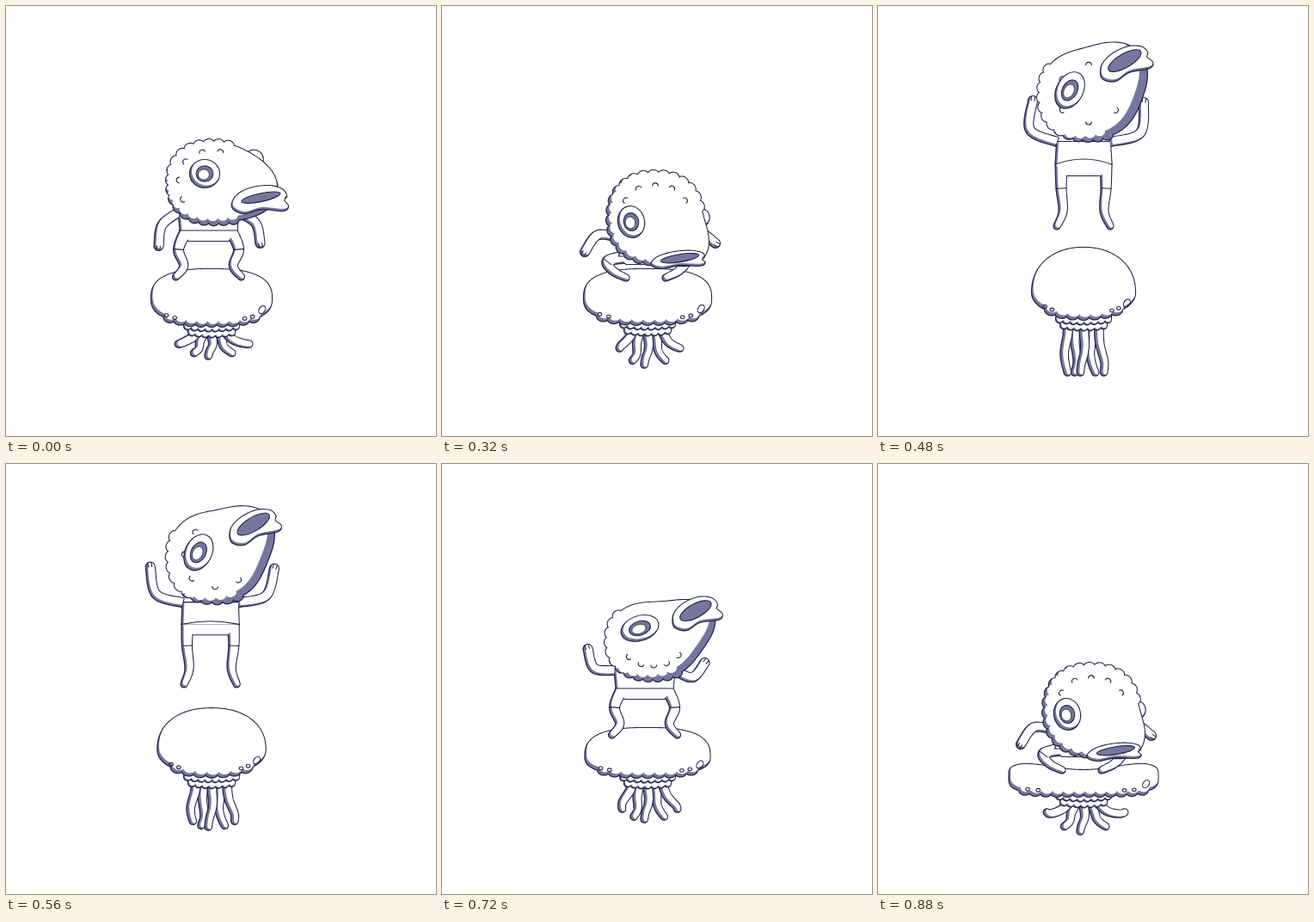
An HTML page with a canvas that plays this animation: 500 px wide and 500 px high, repeating every 960 ms.

```html
<!DOCTYPE html>
<html lang="en">
<head>
<meta charset="utf-8">
<title>Bounce</title>
<style>
html, body { margin: 0; width: 100%; height: 100%; overflow: hidden; background: #fff; }
canvas { display: block; width: 100vw; height: 100vh; }
</style>
</head>
<body>
<canvas id="stage" width="500" height="500"></canvas>
<script>
const ctx = document.getElementById('stage').getContext('2d');
const INK = '#25244a', SHADE = '#75779c', PAPER = '#fff';
const STEP = 80, RAD = Math.PI / 180;

// Heads: offsets are from the skull centre, angles in degrees.
// snout: angle, reach, spread. wool and marks: angular ranges.
const forward = {
  at: [240, 205], size: [50, 46], snout: [8, 26, 35], wool: [-60, -305], marks: [-75, -210], markAt: .77,
  eye: [-9, -10], eyeSize: [17, 16], eyeTilt: 0, far: [-29, 10.5],
  mouth: [56, 19], lips: [32, 15], lipTilt: -12, open: .32, light: [-1, -5]
};
const down = {
  at: [248, 246], size: [53, 51], snout: [40, 18, 30], wool: [-8, -268], marks: [-30, -150], markAt: .72,
  eye: [-28, 5], eyeSize: [15, 18], eyeTilt: -12, far: [0, 10.5],
  mouth: [28, 48], lips: [31, 9], lipTilt: -9, open: .5, light: [3, -3]
};
const upward = {
  at: [245, 103], size: [56, 51], snout: [-40, 20, 40], wool: [-142, -301], marks: [-90, -330], markAt: .62,
  eye: [-22, -5], eyeSize: [15, 22], eyeTilt: 28, far: [-29, 0],
  mouth: [42, -38], lips: [30, 16], lipTilt: -30, open: .5, light: [-9, -4]
};
const falling = {
  ...upward, at: [243, 115], size: [52, 52], snout: [-32, 22, 30], wool: [-157, -311], marks: [-190, -290], markAt: .75,
  eye: [-18, -5], eyeSize: [15, 21], eyeTilt: 25, mouth: [46, -34], lips: [29, 16], lipTilt: -32, light: [-6, -5]
};
const landing = {
  ...falling, at: [245, 205], size: [52, 44], snout: [-25, 25, 30], wool: [-138, -313], marks: [-215, -330], markAt: .65,
  eye: [-15, -14], eyeSize: [22, 14], eyeTilt: -18, mouth: [50, -33], lips: [28, 16], lipTilt: -28
};

// Bodies: offsets are from the middle of the waist; legs mirror each other.
const stand = {
  at: [235.5, 261], shoulder: [35, -21], waist: 33, crotch: [23, 12], sag: 0,
  handL: [-58, 18], handR: [60, 15], bend: 9, knee: [35, 22], toe: [38, 54], instep: 8
};
const crouch = {
  at: [237, 291], shoulder: [32, -22], waist: 32, crotch: [23, 9], sag: 0,
  handL: [-71, -5], handR: [81, -15], bend: 12, knee: [45, 6], toe: [23, 25], instep: -6
};
const leap = {
  at: [239, 184], shoulder: [31, -26], waist: 32.5, crotch: [20, 13], sag: -12,
  handL: [-59, -74], handR: [70, -72], bend: -20, knee: [26, 28], toe: [31, 72], instep: 5
};
const fall = {
  at: [235.5, 190], shoulder: [34, -24], waist: 34, crotch: [21, 10], sag: 0,
  handL: [-86, -56], handR: [81, -54], bend: -11, knee: [29, 20], toe: [30, 66], instep: 4
};
const land = { ...stand, handL: [-66, -46], handR: [70, -30], bend: -13 };

// Jelly: top, widest and bottom y, half width, squareness, dip of the top; tentacle length, fan and curl.
const jelly = (top, mid, bottom, half, square, dip, length, fan, curl) =>
  ({ top, mid, bottom, half, square, dip, length, fan, curl });
const rest = jelly(306, 340, 369, 70, 2.6, 0, 26, 12, 14);
const rise = jelly(296, 332, 363, 70, 2.3, 0, 44, 10, 22);
const pressed = jelly(306, 340, 367, 74, 2.7, 0, 38, 9, 19);
const tall = jelly(281, 333, 361, 60, 2.15, 0, 53, 2, 0);
const waiting = jelly(289, 330, 360, 66.5, 2.3, 0, 44, 6, 17);
const hit = jelly(307, 340, 361, 72.5, 2.7, 0, 40, 7.5, 12);
const flat = jelly(346, 363, 383, 86.5, 4, 10, 32, 14, 22);

function mix(a, b, k) {
  if (typeof a === 'number') return a + (b - a) * k;
  if (Array.isArray(a)) return a.map((v, i) => mix(v, b[i], k));
  return Object.fromEntries(Object.keys(a).map(key => [key, mix(a[key], b[key], k)]));
}
const lower = (part, dy) => ({ ...part, at: [part.at[0], part.at[1] + dy] });
const pose = (head, body, bell) => ({ head, body, bell });

const standing = pose(forward, stand, rest);
const raised = pose(lower(forward, -9), lower(stand, -12.5), rise);
const crouched = pose(down, crouch, pressed);
const high = pose(upward, leap, tall);
const dropping = pose(falling, fall, waiting);
const touching = pose(landing, land, hit);
const sunk = pose(lower(down, 40), lower(crouch, 40), flat);
const cycle = [
  standing, mix(standing, raised, .5), raised, mix(raised, crouched, .5), crouched, mix(crouched, high, .5),
  high, mix(high, dropping, .4), dropping, touching, mix(touching, sunk, .5), sunk
];

const add = (a, b) => [a[0] + b[0], a[1] + b[1]];
const polar = (angle, r) => [Math.cos(angle * RAD) * r, Math.sin(angle * RAD) * r];
const sweep = (from, to, count, at) => Array.from({ length: count + 1 }, (_, i) => at(from + (to - from) * i / count));

function superRadius(angle, rx, ry, n) {
  const [c, s] = polar(angle, 1);
  return (Math.abs(c / rx) ** n + Math.abs(s / ry) ** n) ** (-1 / n);
}

// Smooth curve through the given points.
function curve(points, closed = false, steps = 10) {
  const n = points.length, out = [];
  const at = i => points[closed ? (i + n) % n : Math.max(0, Math.min(n - 1, i))];
  for (let i = 0; i < (closed ? n : n - 1); i++) {
    for (let s = 0; s < steps; s++) {
      const t = s / steps;
      out.push([0, 1].map(d => {
        const [a, b, c, e] = [-1, 0, 1, 2].map(k => at(i + k)[d]);
        return b + t / 2 * (c - a + t * (2 * a - 5 * b + 4 * c - e + t * (3 * (b - c) + e - a)));
      }));
    }
  }
  if (!closed) out.push(points[n - 1]);
  return out;
}

function offset(points, i, w) {
  const a = points[Math.max(0, i - 1)], b = points[Math.min(points.length - 1, i + 1)];
  const dx = b[0] - a[0], dy = b[1] - a[1], d = Math.hypot(dx, dy) || 1;
  return add(points[i], [-dy / d * w, dx / d * w]);
}

function scallop(points, size, depth) {
  let total = 0;
  const along = points.map((p, i) => total += i ? Math.hypot(p[0] - points[i - 1][0], p[1] - points[i - 1][1]) : 0);
  const count = Math.round(total / size);
  return points.map((p, i) => offset(points, i, depth * Math.sqrt(Math.abs(Math.sin(Math.PI * count * along[i] / total)))));
}

function polygon(points) {
  const path = new Path2D();
  points.forEach(([x, y]) => path.lineTo(x, y));
  path.closePath();
  return path;
}

function limb(points, from, to) {
  const mid = curve(points), last = mid.length - 1;
  const side = sign => mid.map((p, i) => offset(mid, i, sign * (from + (to - from) * i / last) / 2));
  const left = side(1), right = side(-1).reverse();
  const start = Math.atan2(left[last][1] - mid[last][1], left[last][0] - mid[last][0]) / RAD;
  const end = sweep(start, start - 180, 8, a => add(mid[last], polar(a, to / 2)));
  return polygon([...left, ...end, ...right]);
}

function ellipse([x, y], [rx, ry], tilt = 0) {
  const path = new Path2D();
  path.ellipse(x, y, rx, ry, tilt * RAD, 0, Math.PI * 2);
  return path;
}

function line(path, width = 1.1) {
  ctx.strokeStyle = INK;
  ctx.lineWidth = width;
  ctx.stroke(path);
}
function fill(path, colour) {
  ctx.fillStyle = colour;
  ctx.fill(path);
}
// Shadow stays where the paper-coloured copy has been shifted away.
function shaded(path, dx, dy) {
  ctx.save();
  ctx.clip(path);
  fill(path, SHADE);
  ctx.translate(dx, dy);
  fill(path, PAPER);
  ctx.restore();
}
function solid(path, dx, dy) {
  line(path, 2.2);
  shaded(path, dx, dy);
}
function segment([x1, y1], [x2, y2], sag = 0) {
  const path = new Path2D();
  path.moveTo(x1, y1);
  path.quadraticCurveTo((x1 + x2) / 2, (y1 + y2) / 2 + sag, x2, y2);
  line(path);
}

function drawJelly({ top, mid, bottom, half, square, dip, length, fan, curl }) {
  const cx = 239, under = bottom - mid;
  for (const i of [-1, 1, -2, 2, 0]) {
    const strand = sweep(0, 1, 5, s => [
      cx + i * (9 + fan * s) + 4 * Math.sin(s * 5 + i * 2) * s,
      bottom + 12 + length * s - curl * (i * s / 2) ** 2
    ]);
    solid(limb(strand, 10, 7.5), 2.8, -1);
  }
  for (const [w, drop] of [[27, 13], [32, 6]]) {
    const hem = scallop(sweep(-1, 1, 80, k => [cx + k * w, bottom + drop - 3 * k * k]), 8, 3.5);
    solid(polygon([[cx - w, bottom], ...hem, [cx + w, bottom]]), 1, -1);
  }
  const rim = angle => {
    const ry = angle < 0 ? mid - top : under;
    const [x, y] = polar(angle, superRadius(angle, half, ry, square));
    const sink = angle < 0 ? dip * Math.cos(x / half * Math.PI / 2) ** 2 : 0;
    return [cx + x, mid + y + sink];
  };
  const edge = Math.atan2(under * .75, half * .8) / RAD;
  const hem = scallop(sweep(180 - edge, edge, 240, rim), 13, 4);
  solid(polygon([...hem, ...sweep(edge, -180 - edge, 160, a => rim(a < -180 ? a + 360 : a))]), 1.6, -3.2);
  for (const k of [-.75, -.61, .55, .68]) {
    const y = mid + under * (1 - Math.abs(k) ** square) ** (1 / square) - 3;
    line(ellipse([cx + half * k, y], [2.3, 1.9]));
  }
  line(ellipse([cx + half * .84, mid + under * .45], [3.4, 5], 35));
}

function arm(shoulder, hand, bend) {
  const dx = hand[0] - shoulder[0], dy = hand[1] - shoulder[1], d = Math.hypot(dx, dy);
  const elbow = [shoulder[0] + dx / 2 - dy / d * bend, shoulder[1] + dy / 2 + dx / d * bend];
  return [shoulder, elbow, hand];
}

function drawFingers([, elbow, hand]) {
  const angle = Math.atan2(hand[1] - elbow[1], hand[0] - elbow[0]) / RAD;
  for (const side of [-2, 2]) {
    const root = add(hand, polar(angle + 90, side));
    segment(root, add(root, polar(angle, 4.5)));
  }
}

function drawBody({ at, shoulder, waist, crotch, sag, handL, handR, bend, knee, toe, instep }) {
  const place = (side, [x, y]) => add(at, [side * x, y]);
  const leg = side => [
    [waist - 6.5, 1], knee, [mix(knee[0], toe[0], .6) - instep, mix(knee[1], toe[1], .6)], toe
  ].map(p => place(side, p));
  const legs = [leg(-1), leg(1)];
  const arms = [arm(place(-1, shoulder), add(at, handL), bend), arm(place(1, shoulder), add(at, handR), -bend)];
  const hips = [-1, 1].map(side => place(side, [waist, 0]));
  const trunk = polygon([place(-1, shoulder), place(1, shoulder), hips[1], hips[0]]);
  const pelvis = polygon([...hips, place(1, crotch), place(-1, crotch)]);
  const limbs = [...legs.map(l => limb(l, 13, 7)), ...arms.map(a => limb(a, 10, 10))];

  [...limbs, trunk, pelvis].forEach(path => line(path, 2.2));
  limbs.forEach(path => shaded(path, 2, -1.8));
  shaded(trunk, 2, 0);
  fill(pelvis, PAPER);
  segment(...hips, sag);
  legs.forEach(([hip, k, ankle]) => {
    const across = Math.atan2(ankle[1] - hip[1], ankle[0] - hip[0]) / RAD + 90;
    segment(add(k, polar(across, 6)), add(k, polar(across, -6)));
  });
  arms.forEach(drawFingers);
}

// Unit outline of the beak: upper lip, notch, lower lip.
const BEAK = [[-1.07, .2], [-.84, -.6], [-.3, -.95], [.37, -.85], [.83, -.37], [.94, .2],
  [.82, .5], [.92, 1.03], [.7, 1.27], [-.05, .8], [-.7, .85]];

function drawMouth(centre, [length, height], tilt, open) {
  const place = ([u, v]) => add(centre, add(polar(tilt, u * length), polar(tilt + 90, v * height)));
  solid(polygon(curve(BEAK.map(place), true)), .8, -2.2);
  const gap = ellipse(place([.02, -.08]), [length * .72, height * open], tilt);
  fill(gap, SHADE);
  line(gap);
}

function drawHead({ at, size, snout, wool, marks, markAt, eye, eyeSize, eyeTilt, far, mouth, lips, lipTilt, open, light }) {
  const rim = (angle, scale = 1) => {
    const turn = ((angle - snout[0]) % 360 + 540) % 360 - 180;
    const bulge = snout[1] * Math.exp(-((turn / snout[2]) ** 2));
    return add(at, polar(angle, scale * (superRadius(angle, ...size, 2.3) + bulge)));
  };
  if (far[1] > 1) solid(ellipse(rim(far[0], .93), [far[1], far[1]]), 1, -2);

  const fleece = scallop(sweep(...wool, 300, a => rim(a)), 12, 4);
  const face = sweep(wool[1], wool[0] - 360, 60, a => rim(a));
  solid(polygon([...fleece, ...face]), ...light);

  sweep(...marks, 4, angle => {
    const [x, y] = rim(angle, markAt), mark = new Path2D();
    mark.arc(x, y, 3.4, (angle - 85) * RAD, (angle + 85) * RAD);
    line(mark);
  });

  const centre = add(at, eye), iris = eyeSize.map(r => r * .58);
  solid(ellipse(centre, eyeSize, eyeTilt), 2, -2.5);
  const ring = ellipse(centre, iris, eyeTilt);
  fill(ring, SHADE);
  line(ring);
  const pupil = ellipse(add(centre, [-1, 1]), iris.map(r => r * .66), eyeTilt);
  fill(pupil, PAPER);
  line(pupil, .8);

  drawMouth(add(at, mouth), lips, lipTilt, open);
}

const start = performance.now();
function render() {
  const index = Math.floor((performance.now() - start) / STEP) % cycle.length;
  const { head, body, bell } = cycle[index];
  ctx.fillStyle = PAPER;
  ctx.fillRect(0, 0, 500, 500);
  ctx.lineJoin = ctx.lineCap = 'round';
  drawJelly(bell);
  drawBody(body);
  drawHead(head);
  requestAnimationFrame(render);
}
render();
</script>
</body>
</html>
```
